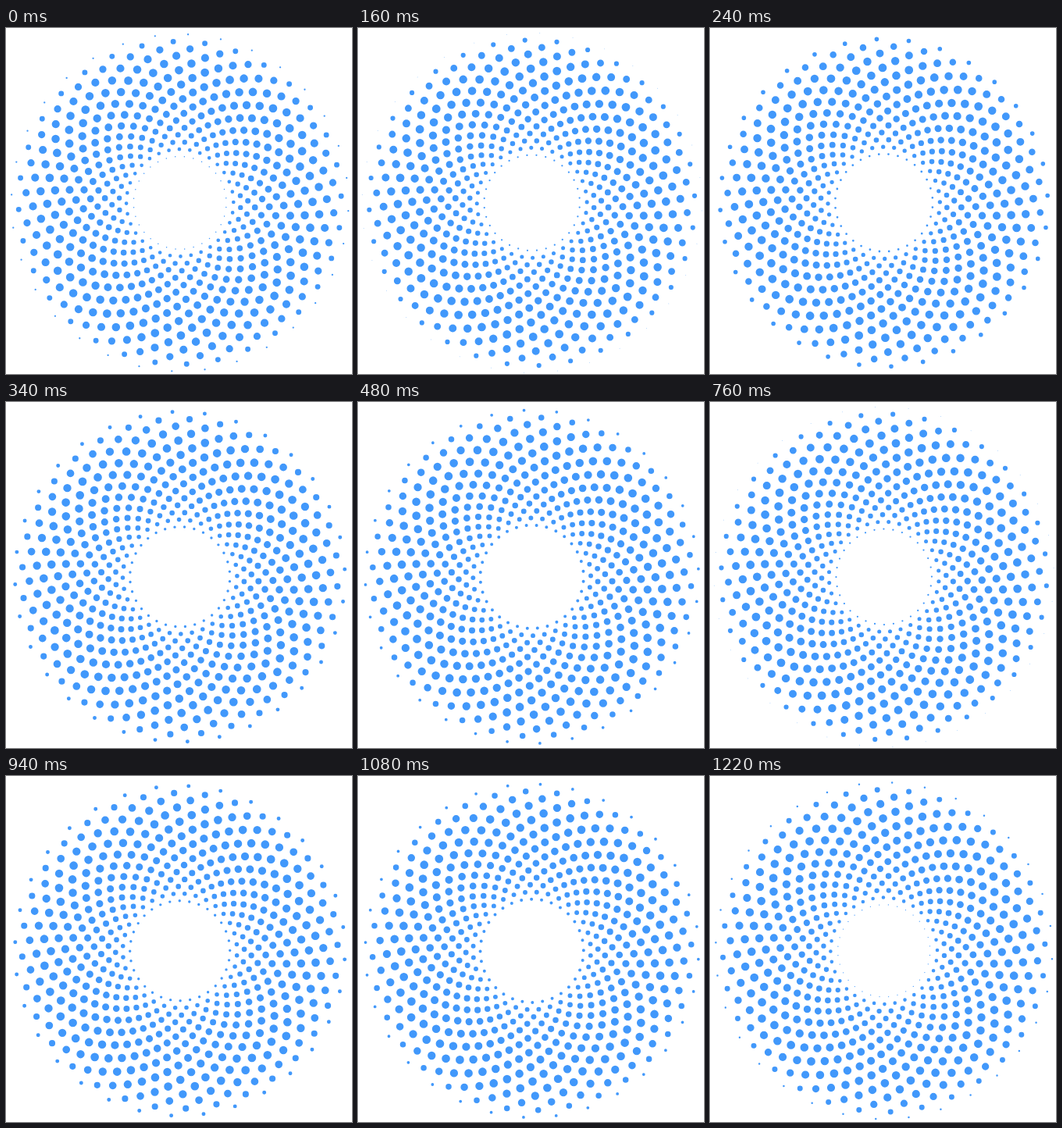
An HTML page with a canvas for the animation above (1.24 s loop, 443 by 443 pixels).

```html
<!DOCTYPE html>
<html lang="en">
<head>
<meta charset="utf-8">
<title>Spiral dots</title>
<style>
  html, body { margin: 0; width: 100%; height: 100%; overflow: hidden; background: #fff; }
  canvas { display: block; width: 443px; height: 443px; }
</style>
</head>
<body>
<canvas id="stage" width="443" height="443"></canvas>
<script>
const ctx = document.getElementById('stage').getContext('2d');
const SIZE = 443, CX = 222.7, CY = 223.8;
const LOOP = 1240, STEP = 20, POSES = 60;
const SPOKES = 32, RINGS = 18, INNER = 59.4, GAP = 9.2;
const TURN = Math.PI * 2;
const rad = deg => deg * Math.PI / 180;

// Dot radius by distance from the centre: [distance, radius]
const PROFILE = [
  [57.5, 0], [59.4, 0.75], [64, 1.7], [69, 2.4], [78, 3.2], [96, 3.85],
  [115, 4.45], [133, 4.9], [152, 5.2], [172, 5.4], [188, 5.1],
  [198, 4.6], [207, 3.4], [212, 2.3], [216, 1.1], [218.5, 0]
];

function dotRadius(dist) {
  for (let i = 1; i < PROFILE.length; i++) {
    const [d0, r0] = PROFILE[i - 1], [d1, r1] = PROFILE[i];
    if (dist >= d0 && dist <= d1) return r0 + (r1 - r0) * (dist - d0) / (d1 - d0);
  }
  return 0;
}

// Clockwise angle from the top along one spiral arm
const armAngle = dist => rad(2.75 + 0.0533 * (216 - dist));

function drawRing(ring, dist) {
  const radius = dotRadius(dist);
  if (radius <= 0) return;
  const shift = ring % 2 ? 0 : 0.5;
  for (let i = 0; i < SPOKES; i++) {
    const a = armAngle(dist) + (i + shift) * TURN / SPOKES;
    const x = CX + dist * Math.sin(a), y = CY - dist * Math.cos(a);
    ctx.moveTo(x + radius, y);
    ctx.arc(x, y, radius, 0, TURN);
  }
}

function draw(ms) {
  // The first pose is held for three steps
  const pose = Math.max(0, Math.floor((ms % LOOP) / STEP) - 2);
  const travel = 2 * pose / POSES;
  ctx.fillStyle = '#fff';
  ctx.fillRect(0, 0, SIZE, SIZE);
  ctx.fillStyle = '#4198fb';
  ctx.beginPath();
  for (let ring = -2; ring < RINGS; ring++) {
    drawRing(ring, INNER + GAP * (ring + travel));
  }
  ctx.fill();
}

let start;
function tick(now) {
  start ??= now;
  draw(Math.max(0, now - start));
  requestAnimationFrame(tick);
}
draw(0);
requestAnimationFrame(tick);
</script>
</body>
</html>
```
